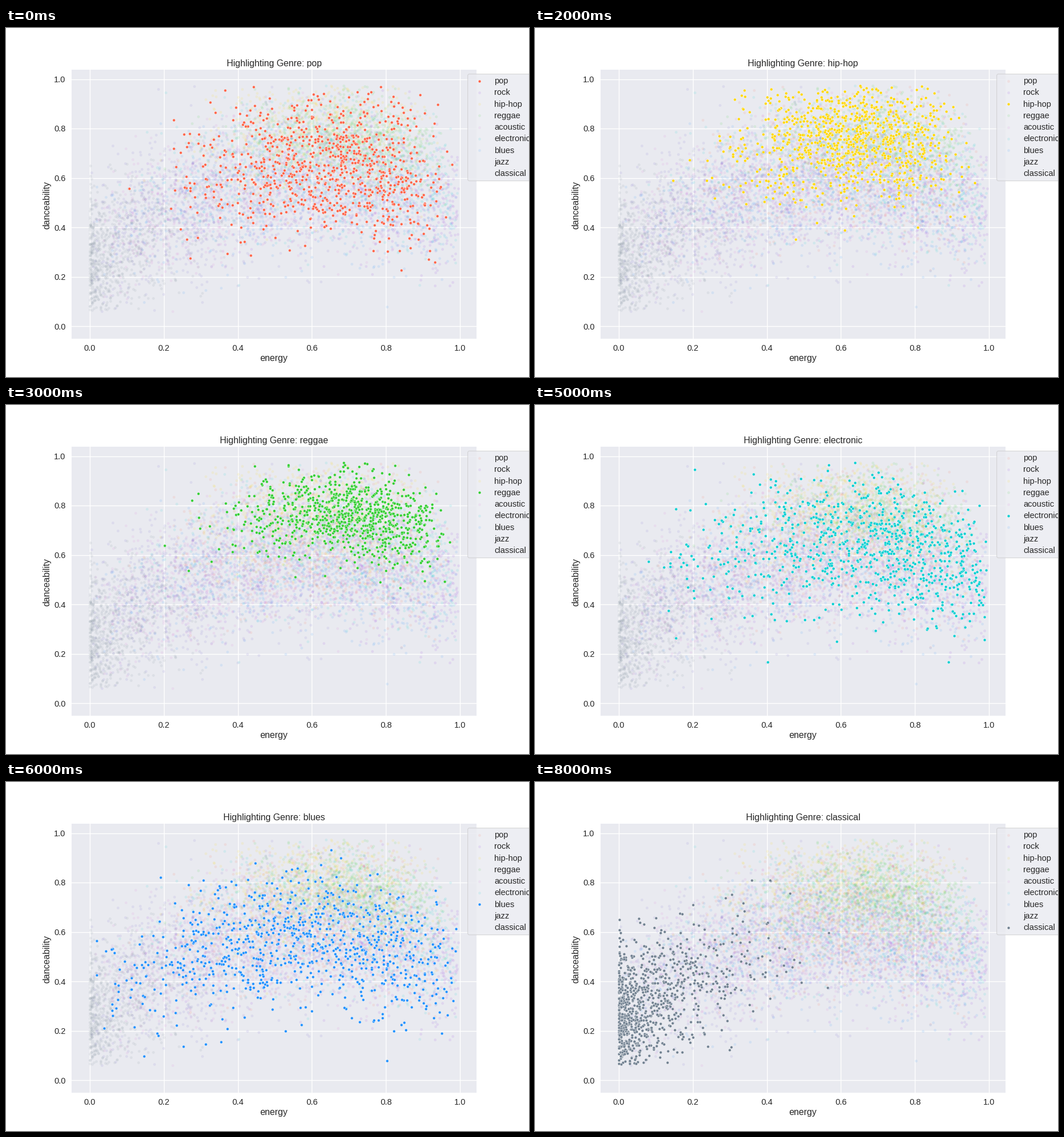
A matplotlib script for the animation above (9 s loop, 917 by 611 pixels).

```python
import numpy as np
import matplotlib.pyplot as plt
from matplotlib.animation import FuncAnimation
from matplotlib.patches import FancyBboxPatch

W, H, DPI = 917, 611, 64
INK, PANEL = "#262626", "#E9EAF0"
FADED = 0.1
DOT, EDGE = 4.9, 0.45  # marker diameter and rim in pixels
COUNT = 850  # songs per genre
VISIBLE_KEYS = 7  # later keys show only when active

plt.rcParams["font.family"] = "Liberation Sans"
rng = np.random.default_rng(12)

# name: colour, beta shape of energy, peak and spread of danceability
GENRES = {
    "pop": ("tomato", 4.4, 2.4, .66, .14),
    "rock": ("blueviolet", 2.7, 1.15, .6, .13),
    "hip-hop": ("gold", 6, 3.6, .77, .12),
    "reggae": ("limegreen", 8, 3.6, .78, .09),
    "acoustic": ("orchid", 2, 3, .57, .13),
    "electronic": ("darkturquoise", 2.9, 1.5, .66, .14),
    "blues": ("dodgerblue", 2.2, 1.6, .58, .135),
    "jazz": ("slateblue", 1.5, 3, .58, .16),
    "classical": ("slategray", .6, 5.4, .5, .14),
}


def pt(px):
    return px * 72 / DPI


def cloud(a, b, peak, spread):
    """Danceability is highest at medium energy and falls off on both sides."""
    x = rng.beta(a, b, 2 * COUNT)
    y = rng.normal(peak - .75 * (x - .58) ** 2, spread)
    keep = (x < .995) & (y > .06) & (y < .975)
    return x[keep][:COUNT], y[keep][:COUNT]


def dots(axes, x, y, color):
    return axes.scatter(x, y, s=pt(DOT) ** 2, color=color, edgecolors="white",
                        linewidths=pt(EDGE), alpha=FADED)


def label(x, y, text, size, **kw):
    return stage.text(x, y, text, size=pt(size), color=INK, va="baseline", **kw)


fig = plt.figure(figsize=(W / DPI, H / DPI), dpi=DPI, facecolor="white")

# Plot panel
ax = fig.add_axes([.125, .11, .775, .77], facecolor=PANEL)
ax.set(xlim=(-.0497, 1.0451), ylim=(-.0494, 1.0374))
ticks = np.arange(6) / 5
ax.set_xticks(ticks, [])
ax.set_yticks(ticks, [])
ax.tick_params(length=0)
ax.spines[:].set_visible(False)
ax.set_axisbelow(True)
ax.grid(color="white", lw=pt(1.4))

# Overlay in pixel units for text and legend
stage = fig.add_axes([0, 0, 1, 1])
stage.set(xlim=(0, W), ylim=(H, 0))
stage.axis("off")

for t in ticks:
    label(146.8 + 649.1 * t, 564.6, f"{t:.1f}", 14.6, ha="center")
    label(104.5, 527.7 - 432.9 * t, f"{t:.1f}", 14.6, ha="right")
label(470, 582.5, "energy", 15.9, ha="center")
label(76.6, 309.5, "danceability", 15.9, ha="center", rotation=90, rotation_mode="anchor")
title = label(470, 67, "", 15.9, ha="center")

stage.add_patch(FancyBboxPatch((809.6, 80.6), 115, 187, boxstyle="round,pad=0,rounding_size=2.9",
                               fc=PANEL, ec="0.8", lw=pt(1.06), alpha=.8))

names = list(GENRES)
clouds, keys = [], []
for i, (name, (color, *shape)) in enumerate(GENRES.items()):
    row = 92.5 + 20.3 * i
    clouds.append(dots(ax, *cloud(*shape), color))
    keys.append(dots(stage, 830, row, color))
    keys[-1].set_zorder(3)
    label(856.3, row + 4.5, name, 14.6)


def update(active):
    title.set_text(f"Highlighting Genre: {names[active]}")
    for i, (points, key) in enumerate(zip(clouds, keys)):
        on = i == active
        points.set_alpha(1 if on else FADED)
        points.set_zorder(2 if on else 1)
        key.set_alpha(1 if on else FADED)
        key.set_visible(on or i < VISIBLE_KEYS)
    return [title, *clouds, *keys]


anim = FuncAnimation(fig, update, frames=len(names), interval=1000, repeat=True, repeat_delay=0)
plt.show()
```
